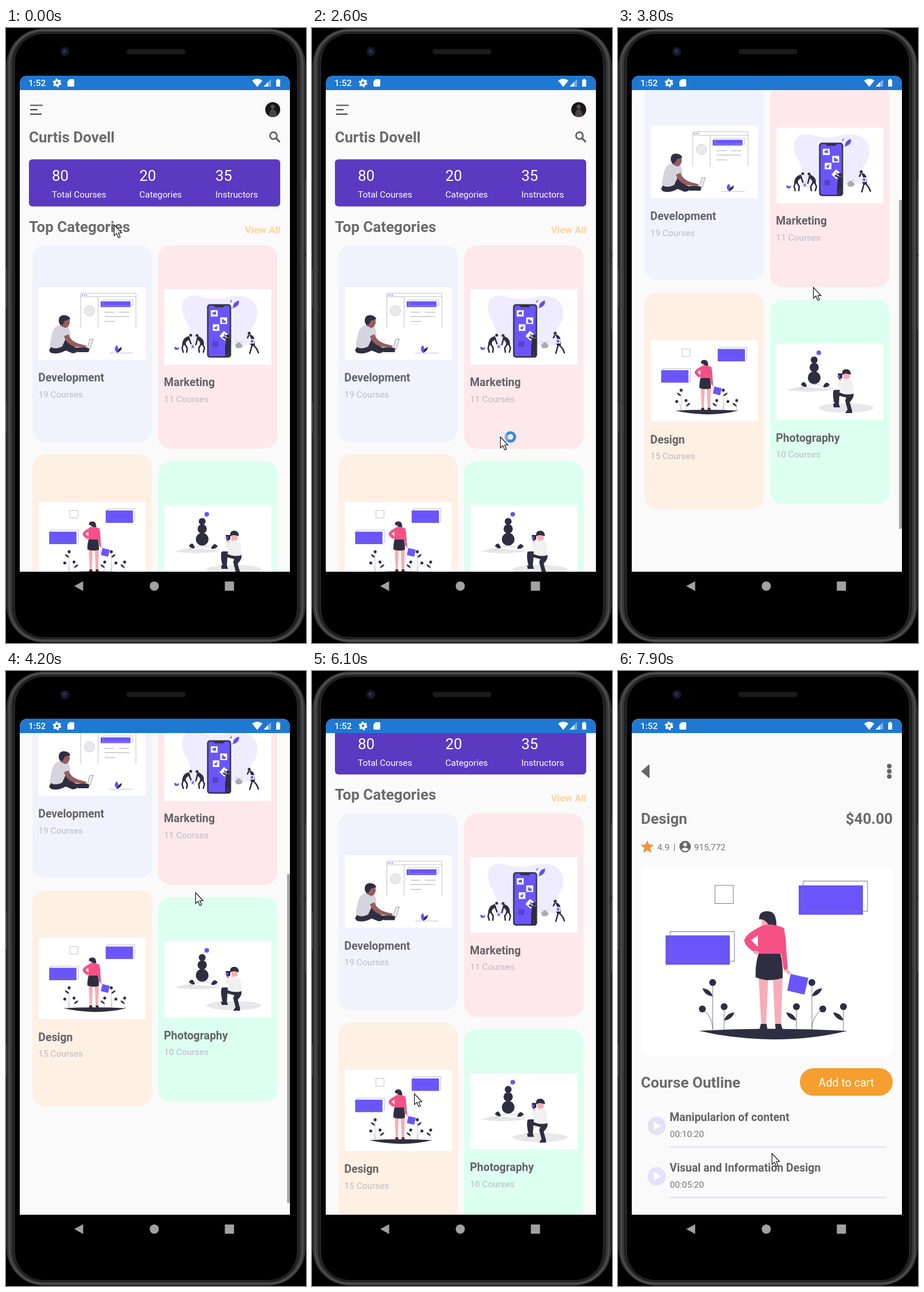
These frames come from a looping animation (523x1070 px, 8000 ms). An HTML page:

```html
<!DOCTYPE html>
<html lang="en">
<head>
<meta charset="utf-8">
<title>Course app</title>
<style>
  html, body { margin: 0; width: 100%; height: 100%; overflow: hidden; background: #000; }
  svg { display: block; width: 100vw; height: 100vh; }
  text { font-family: Roboto, sans-serif; font-size: 15.4px; fill: #777; }
  .h { font-size: 26px; font-weight: 700; fill: #6b6b6b; }
  .b { font-size: 19.4px; font-weight: 700; fill: #636367; }
  .sub { fill: #bbbbc1; }
  .num { font-size: 26px; fill: #fff; }
  .w { fill: #fff; }
  .end { text-anchor: end; }
  .ink { fill: #2f2e41; }
  .vio { fill: #6a55fa; }
  .skin { fill: #f7adb4; }
  .brown { fill: #935f5e; }
  .line { fill: none; stroke: #77768a; stroke-width: 1; }
  .thin { fill: none; stroke: #a9a9b0; stroke-width: .7; }
  .limb { fill: none; stroke: #2f2e41; stroke-width: 2.6; stroke-linecap: round; stroke-linejoin: round; }
</style>
</head>
<body>
<svg viewBox="0 0 523 1070">
  <defs>
    <clipPath id="screen"><path d="M24 946V98Q24 83 39 83H480Q495 83 495 98V946Z"/></clipPath>
    <clipPath id="face"><circle cx="465" cy="142" r="13"/></clipPath>

    <g id="design">
      <rect x="129" y="35" width="32" height="31.500" class="line"/>
      <rect x="275" y="35" width="112" height="51" class="vio"/>
      <rect x="283" y="27.500" width="112" height="52.500" class="line"/>
      <rect x="43" y="122" width="112" height="51" class="vio"/>
      <rect x="51" y="115.500" width="112" height="51.500" class="line"/>
      <path class="ink" d="M101 288Q230 281 360 288Q300 303 231 303Q160 302 101 288Z"/>
      <g id="plants"></g>
      <path class="skin" d="M205 194H222L218 280H210ZM230 194H247L244 280H234Z"/>
      <path class="ink" d="M209 276H219L221 288H206ZM234 276H244L248 289H235Z"/>
      <path class="skin" d="M210 92H224V109H212ZM247 150L252 149L256 181L262 188L258 190L250 184Z"/>
      <path class="ink" d="M206 92Q206 81 218 80Q231 79 234 89Q237 99 236 105L222 103Q216 93 206 94Z"/>
      <path fill="#f55187" d="M211 105Q230 100 249 109Q253 125 253 142L256 180L249 182L244 152L243 158H205V149L203 153Q185 146 180 132Q180 124 195 114ZM204 122L192 130L204 142Z"/>
      <path class="skin" d="M198 148L206 150L203 156L196 153Z"/>
      <path class="ink" d="M205 154H243Q248 172 247 196Q223 204 200 195Q199 172 205 154Z"/>
      <path class="vio" d="M261 189L292 196L285 225L255 218Z"/>
    </g>
  </defs>

  <!-- phone body -->
  <path d="M0 420V485M0 650V705M522 265V393M522 398V525" stroke="#333" stroke-width="2"/>
  <rect x="1.500" y="1.500" width="520" height="1067" rx="64" fill="#222" stroke="#444"/>
  <g fill="none">
    <rect x="7" y="5" width="509" height="1060" rx="58" stroke="#393939" stroke-width="7"/>
    <rect x="5.500" y="4" width="512" height="1062" rx="60" stroke="#525252" stroke-width="2"/>
    <rect x="12" y="8" width="499" height="1054" rx="53" stroke="#1c1c1c" stroke-width="2"/>
  </g>
  <rect x="15" y="9.500" width="493" height="1051" rx="50" fill="#000" stroke="#363636"/>
  <rect x="210" y="36.500" width="103" height="9" rx="4.500" fill="#1c1b1b"/>
  <circle cx="102.500" cy="41" r="8" fill="#15161c"/>
  <circle cx="102.500" cy="41" r="5" fill="#1b1e3c"/>
  <circle cx="101.500" cy="40" r="2" fill="#353c78"/>
  <g fill="#a1a1a1">
    <path d="M119 971L134.500 962.500V979.500Z"/>
    <circle cx="258.500" cy="971" r="8"/>
    <rect x="381.500" y="963" width="16" height="16" rx="1"/>
  </g>

  <g clip-path="url(#screen)">
    <rect x="24" y="83" width="471" height="863" fill="#fafafa"/>

    <!-- category list -->
    <g id="list">
      <path d="M42 134.500H64M42 142.200H55M42 149.800H62" stroke="#4a4a4a" stroke-width="2.200"/>
      <g clip-path="url(#face)">
        <rect x="452" y="129" width="26" height="26" fill="#17171a"/>
        <path fill="#4a4346" d="M459 155Q458 142 465 141Q472 142 472 155Z"/>
        <circle cx="465" cy="137" r="3.600" fill="#5c4f50"/>
      </g>
      <text class="h" x="40" y="199">Curtis Dovell</text>
      <circle cx="466.300" cy="187.300" r="6" fill="none" stroke="#666" stroke-width="3"/>
      <path d="M470.800 191.800L476.500 197.500" stroke="#666" stroke-width="3.400" stroke-linecap="round"/>

      <rect x="40" y="228.500" width="438" height="82" rx="6" fill="#5b39c1"/>
      <text class="num" x="80" y="266">80</text>
      <text class="num" x="232.500" y="266">20</text>
      <text class="num" x="365" y="266">35</text>
      <text class="w" x="80" y="295.300">Total Courses</text>
      <text class="w" x="232.500" y="295.300">Categories</text>
      <text class="w" x="365" y="295.300">Instructors</text>

      <text class="h" x="40" y="354.500">Top Categories</text>
      <text class="end" x="478.500" y="357" style="font-size:17px;font-weight:700;fill:#fcd4a0">View All</text>
      <g id="cards"></g>

      <!-- development -->
      <g>
        <path class="thin" d="M130.500 522V461.500H226.500V522M130.500 467.500H226.500M160.500 467.500V522"/>
        <path d="M132 464.500H134M135.500 464.500H137.500M139 464.500H141" stroke="#6a55fa" stroke-width="1.600"/>
        <circle cx="145.500" cy="492" r="9" fill="#e9e9ec" stroke="#bbb" stroke-width=".6"/>
        <rect x="165" y="475.500" width="52" height="10" class="vio"/>
        <rect x="169" y="473" width="52" height="10" class="thin"/>
        <path class="thin" d="M172 494.500H189M197 494.500H215M172 502H215M172 510.500H190" style="stroke-width:1.600;stroke:#c4c4c9"/>
        <path class="ink" d="M75 561Q84 541 104 541Q112 545 120 555L128 558Q126 565 116 566L104 561Q90 569 78 565Z"/>
        <path fill="#d5d4de" d="M92 517Q82 520 79 537L76 553Q84 561 98 554L104 541L112 539Q113 521 105 517Z"/>
        <path class="brown" d="M95 508H111L111 514L108 520L103 522L95 518ZM101 536L109 533Q112 544 126 549L141 553L138 557L118 554Q104 548 101 536Z"/>
        <path class="ink" d="M92 511Q91 500 101 499.500Q111 500 112 507L103 509L98 517L94 516Z"/>
        <path class="ink" d="M124 556H146L144 564H125Z"/>
        <path d="M142 557L146 542L152 541L147 558Z" fill="#eee" stroke="#777" stroke-width=".7"/>
        <path class="thin" d="M180 565.500H221"/>
        <path class="vio" d="M192 564Q187 557 193 552Q198 557 195 565Z"/>
        <path class="ink" d="M194 565Q195 557 202 555Q202 562 194 565Z"/>
      </g>

      <!-- marketing -->
      <g>
        <path fill="#eeecfe" d="M309 474Q316 464 334 466Q358 474 380 470Q424 457 437 485Q441 507 430 519Q421 532 426 552L320 550Q326 526 311 505Q304 488 309 474Z"/>
        <rect x="350.500" y="480.500" width="42" height="93" rx="5" fill="#34334b"/>
        <path class="vio" d="M353 486Q353 483 356 483H362Q363 486 366 486H377Q380 486 381 483H387Q390 483 390 486V568Q390 571 387 571H356Q353 571 353 568Z"/>
        <g fill="#fff"><rect x="357" y="491" width="12" height="11"/><rect x="373.500" y="503.500" width="12" height="11.500"/><rect x="360.500" y="515.500" width="11.500" height="11.500"/></g>
        <path class="vio" d="M360 495L366 493V499L360 498ZM376 507H380V509H383V513H377ZM362 522L369 518L367 525Z"/>
        <rect x="360" y="545" width="10" height="10" fill="#5444cb"/>
        <path class="vio" d="M396 487Q395 477 406 474Q408 484 396 487ZM390 477L394 472L393 477Z"/>
        <path d="M394 488L405 475" stroke="#2f2e41" stroke-width=".7"/>
        <path class="ink" d="M307 551Q308 538 319 536L321 541L314 546L313 552ZM345 551Q346 540 335 536L332 540L338 546L339 552Z"/>
        <path class="limb" d="M309 550L307 557L309 564M312 550L316 557L315 564M319 540L323 551M343 550L346 557L344 564M340 550L336 557L337 564M334 540L331 551"/>
        <circle class="ink" cx="322" cy="534.500" r="2.500"/><circle class="ink" cx="333" cy="535" r="2.500"/>
        <rect x="322" y="550" width="8" height="8" fill="#dcd9fd"/>
        <path class="vio" d="M324 553L327 552V556L324 556ZM293 556Q296 553 298 557Q301 554 302 556L300 560H295Z"/>
        <path d="M372 536L380 527L390 535L381 544Z" fill="#fff"/>
        <path class="vio" d="M380 532L385 535L381 538Z"/>
        <path class="ink" d="M384 540Q390 539 392 543L391 555L390 573H386.500V558L385.500 573H382L382 555Z"/>
        <path class="limb" d="M387 542L379 538"/>
        <circle class="ink" cx="387" cy="536" r="3"/>
        <path d="M399 552L406 546L413 553L409 557H402Z" fill="#aaa"/>
        <path class="thin" d="M400 544L408 554M412 544L404 554"/>
        <path class="ink" d="M424 533Q432 534 433 541L434 551L430 554L426 551L428 543Z"/>
        <path class="limb" d="M431 551L437 558L440 565M429 552L427 559L425 566M423 535L421 539"/>
        <circle class="ink" cx="424" cy="531" r="2.600"/>
        <rect x="425" y="541" width="8" height="8" fill="#e2dffe"/>
        <path class="vio" d="M427 543H431V547H427Z"/>
      </g>

      <use href="#design" transform="translate(57 824.500) scale(.4247)"/>

      <!-- photography -->
      <g>
        <path d="M294 911Q315 902 344 907Q366 908 374 910Q340 917 294 911Z" fill="#e6e6e8"/>
        <ellipse cx="397.500" cy="942" rx="48" ry="8" fill="#e8e8ea"/>
        <path class="thin" d="M343 852L349 847M318 908Q340 895 371 907"/>
        <circle class="vio" cx="350" cy="846" r="4"/>
        <g class="ink"><circle cx="342" cy="858.500" r="6"/><circle cx="342" cy="871.500" r="8"/><circle cx="342" cy="889.500" r="11"/><path d="M329 905Q322 906 319 901Q321 897 325 897Q329 901 329 905ZM358 906Q365 907 369 902Q367 898 363 898Q358 901 358 906Z"/></g>
        <path class="skin" d="M392 882H404V889L400 894H394ZM385 889L390 892L388 896L384 893Z"/>
        <path class="ink" d="M391 884Q389 875 398 874.500Q406 875 406 884L397 882ZM383 882H391V890L385 892Z"/>
        <circle class="vio" cx="385" cy="887" r="2.300"/>
        <path class="ink" d="M376 911Q383 909 410 914Q412 922 408 927L404 932L408 947L401 948L396 929L398 924L386 921L385 936L378 937Q373 920 376 911ZM375 935H385L387 941H376ZM400 945H408V951H396Z"/>
        <path fill="#f0f0f0" d="M394 892Q406 889 409 898L411 917Q398 921 386 915L388 907L382 902L385 894L392 899Z"/>
      </g>
    </g>
    <rect id="bar" x="490" width="5" height="572" fill="#a6a6a6"/>

    <!-- course page -->
    <g id="course">
      <rect x="24" y="83" width="471" height="863" fill="#fafafa"/>
      <path d="M42 174.500L54 164V185Z" fill="#666" stroke="#666" stroke-width="2" stroke-linejoin="round"/>
      <g fill="#666"><circle cx="473" cy="165.500" r="4"/><circle cx="473" cy="174.500" r="4"/><circle cx="473" cy="183.500" r="4"/></g>
      <text class="h" x="40" y="266">Design</text>
      <text class="h end" x="479" y="266">$40.00</text>
      <path id="star" fill="#f3953a" stroke="#d98330" stroke-width=".8"/>
      <text x="68.500" y="311.500">4.9</text>
      <text x="96.500" y="311.500">|</text>
      <circle cx="117" cy="305.500" r="10" fill="#666"/>
      <circle cx="117" cy="302" r="3.300" fill="#fafafa"/>
      <path d="M110.500 310.500Q117 304 123.500 310.500Q117 316 110.500 310.500Z" fill="#fafafa"/>
      <text x="132.500" y="311.500">915,772</text>
      <rect x="40" y="338" width="438.500" height="332" rx="13" fill="#fff"/>
      <use href="#design" x="40" y="338"/>
      <text class="h" x="40" y="724.500">Course Outline</text>
      <rect x="317" y="691" width="162" height="48" rx="24" fill="#f49f2f"/>
      <text class="w" x="398" y="722.500" text-anchor="middle" style="font-size:19.700px">Add to cart</text>
      <g id="lessons"></g>
    </g>

    <!-- status bar -->
    <rect x="24" y="83" width="471" height="25" fill="#1f78d1"/>
    <text class="w" x="39" y="100.800" style="font-weight:500">1:52</text>
    <g fill="#fff">
      <circle cx="89" cy="95.500" r="4" fill="none" stroke="#fff" stroke-width="3.600"/>
      <circle cx="89" cy="95.500" r="6.300" fill="none" stroke="#fff" stroke-width="2.400" stroke-dasharray="3.300"/>
      <path d="M111 89H117Q119 89 119 91V100Q119 102 117 102H109Q107 102 107 100V93Z"/>
      <path d="M429 91.500Q438 85 447 91.500L438 102.500Z"/>
      <path d="M449 102L462 89V102Z" opacity=".4"/>
      <path d="M449 102L457 94V102Z"/>
      <path d="M471 90H473V88.500H476V90H478V102H471Z"/>
    </g>
  </g>

  <g id="cursor">
    <g id="busy" fill="none" stroke-width="5">
      <circle cx="18" cy=".5" r="7.500" stroke="#2b8fe6"/>
      <path id="arc" d="M18 -7A7.500 7.500 0 0 1 25.500 .500" stroke="#5fb4f4"/>
    </g>
    <path d="M.500 .500V19.500L4.800 15.600L8 23L11 21.700L8 14.500H13.500Z" fill="#fff" stroke="#111" stroke-width="1.200"/>
  </g>
</svg>
<script>
const $ = id => document.getElementById(id);
const clamp = v => Math.max(0, Math.min(1, v));

// x, top, height, colour, picture top, picture height, title baseline, title, count
const cards = [
  [46, 378, 342, '#f0f3fe', 451, 126, 615, 'Development', 19],
  [265, 378, 354, '#fde9eb', 454.5, 131.5, 623, 'Marketing', 11],
  [46, 742, 375.5, '#fef0e3', 824.5, 141, 1003.5, 'Design', 15],
  [265, 753.5, 356, '#ddfff1', 830.5, 132, 1000.5, 'Photography', 10]
];
$('cards').innerHTML = cards.map(([x, y, h, fill, py, ph, ty, name, n]) => `
  <rect x="${x}" y="${y}" width="208.500" height="${h}" rx="22" fill="${fill}"/>
  <rect x="${x + 11}" y="${py}" width="186.500" height="${ph}" fill="#fff"/>
  <text class="b" x="${x + 10.3}" y="${ty}">${name}</text>
  <text class="sub" x="${x + 10.5}" y="${ty + 27.6}">${n} Courses</text>`).join('');

// flower head x, y, stem foot x, leaf side
const plants = [[125, 204, 125, -1], [107, 250, 125, 0], [145, 246, 145, 1], [271, 246, 271, -1],
  [298, 204, 298, 1], [317, 250, 298, 0], [353, 246, 353, -1]];
$('plants').innerHTML = plants.map(([x, y, foot, side]) => `
  <path class="line" d="M${x} ${y}Q${foot} ${y + 12} ${foot} 286"/>
  <circle class="ink" cx="${x}" cy="${y}" r="6"/>
  <path class="ink" d="M${x} ${y + 24}q${side * 4} -13 ${side * 18} -14q${side * -5} 13 ${side * -18} 14Z"/>`).join('');

$('lessons').innerHTML = [['Manipularion of content', '00:10:20'], ['Visual and Information Design', '00:05:20']]
  .map(([name, time], i) => `<g transform="translate(0 ${i * 87.6})">
  <circle cx="67.500" cy="791.500" r="16" fill="#e2e4f5"/>
  <path d="M62.500 784V799L75 791.500Z" fill="#fff"/>
  <text class="b" x="90" y="783">${name}</text>
  <text x="90.500" y="811">${time}</text>
  <rect x="90.500" y="827" width="376.500" height="2.600" fill="#e2e4f5"/></g>`).join('');

$('star').setAttribute('d', 'M' + Array.from({ length: 10 }, (_, i) => {
  const a = i * Math.PI / 5, r = i % 2 ? 5 : 11;
  return `${51 + r * Math.sin(a)} ${306.5 - r * Math.cos(a)}`;
}).join('L') + 'Z');

// Smooth curve through [time, value] keys, flat at turning points
function track(keys) {
  const slope = i => (keys[i + 1][1] - keys[i][1]) / (keys[i + 1][0] - keys[i][0]);
  const tan = keys.map((_, i) => {
    if (!i || i === keys.length - 1) return 0;
    const a = slope(i - 1), b = slope(i);
    return a * b > 0 ? 2 * a * b / (a + b) : 0;
  });
  return t => {
    if (t <= keys[0][0]) return keys[0][1];
    const i = keys.findIndex(k => k[0] > t) - 1;
    if (i < 0) return keys[keys.length - 1][1];
    const [t0, a] = keys[i], [t1, b] = keys[i + 1], d = t1 - t0, u = (t - t0) / d;
    return a + (b - a) * u * u * (3 - 2 * u)
      + d * u * (1 - u) * ((1 - u) * tan[i] - u * tan[i + 1]);
  };
}
const curX = track([[800, 188], [2300, 328], [2700, 328], [3400, 345], [4200, 330], [4700, 306], [6100, 178], [6500, 178], [7900, 268]]);
const curY = track([[800, 342], [2300, 711], [2700, 711], [3400, 560], [4200, 385], [4700, 560], [5000, 615], [6100, 735], [6500, 735], [7900, 839]]);
const scroll = track([[2700, 0], [3400, 154.5], [4200, 360], [4700, 185.5], [5000, 130.5]]);

function draw(t) {
  const s = scroll(t);
  $('list').setAttribute('transform', `translate(0 ${-s})`);
  $('bar').setAttribute('y', 106.5 + s * .686);
  $('bar').setAttribute('opacity', t > 2700 ? 1 - clamp((t - 5300) / 300) : 0);
  $('course').setAttribute('opacity', clamp((t - 6500) / 300));
  $('cursor').setAttribute('transform', `translate(${curX(t)} ${curY(t)})`);
  $('busy').setAttribute('opacity', t >= 2400 && t < 2800 ? 1 : 0);
  $('arc').setAttribute('transform', `rotate(${t * .36} 18 .5)`);
}

function tick() {
  draw(Math.floor(performance.now() % 8000 / 100) * 100);
  requestAnimationFrame(tick);
}
tick();
</script>
</body>
</html>
```
